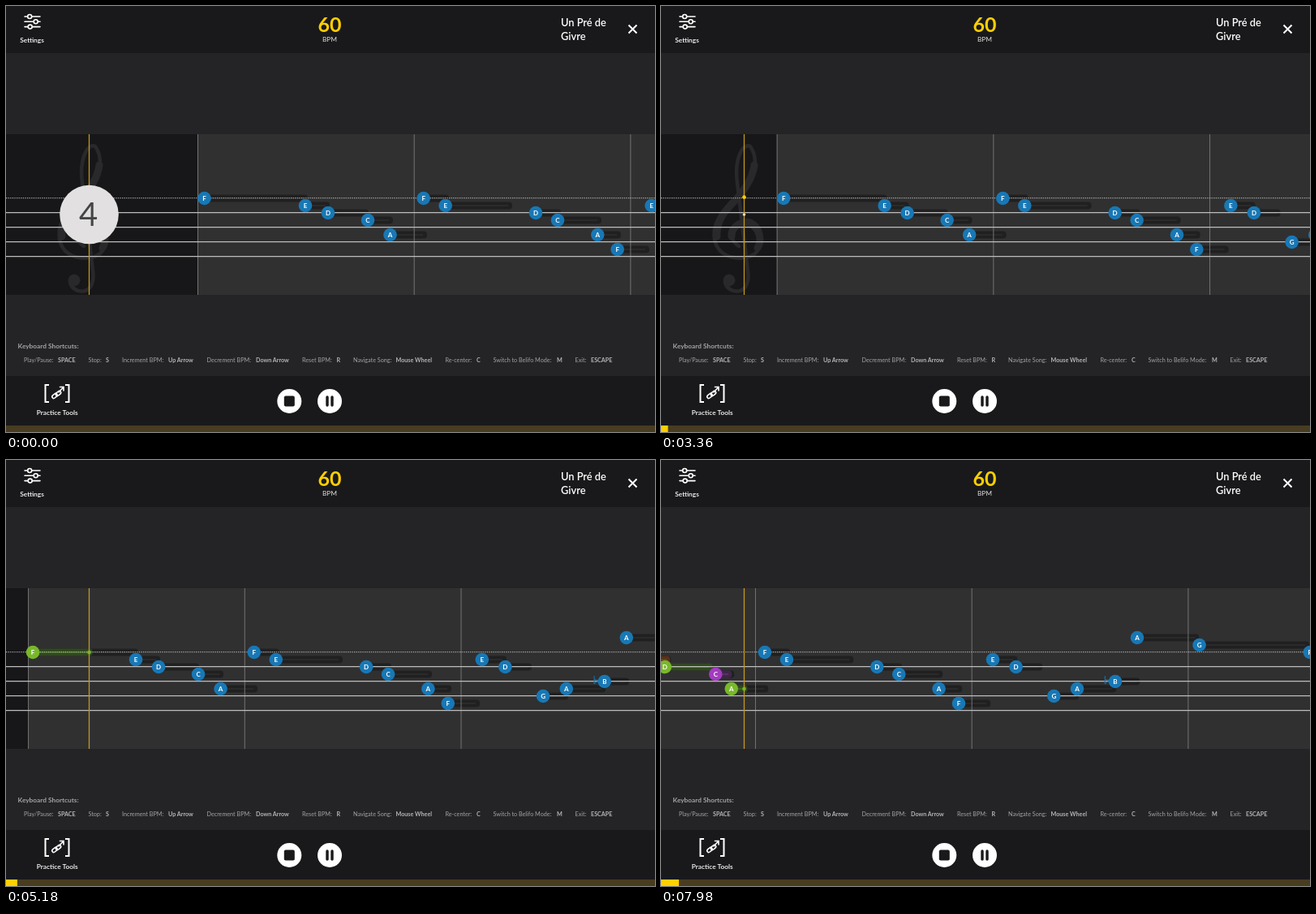
Animation, 800 px wide and 525 px high, one loop 8000 ms. Source, as an HTML page:

```html
<!DOCTYPE html>
<html lang="en">
<head>
<meta charset="utf-8">
<title>Practice player</title>
<style>
html, body { margin: 0; width: 100%; height: 100%; overflow: hidden; background: #242326; }
svg { display: block; width: 100vw; height: 100vh; font-family: Lato, "Open Sans", sans-serif; }
.mid { text-anchor: middle; }
.label { font-size: 8.4px; font-weight: 600; fill: #fff; }
.keys { font-size: 7.2px; fill: #a3a3a4; }
.keys .k { font-weight: 700; fill: #b4b4b5; }
.note text { font-size: 8px; font-weight: 700; fill: #fff; text-anchor: middle; }
.icon { fill: none; stroke: #fff; stroke-width: 1.6; stroke-linecap: round; }
</style>
</head>
<body>
<svg viewBox="0 0 800 525" preserveAspectRatio="none">
  <rect width="800" height="525" fill="#242326"/>
  <rect width="800" height="58" fill="#19191b"/>
  <rect y="456" width="800" height="61" fill="#19191b"/>

  <rect y="158" width="800" height="198" fill="#171719"/>
  <g fill="none" stroke="#29292b" stroke-linecap="round">
    <path stroke-width="4.5" d="M79 341C84 357 112 357 107 326L94 218C90 188 101 168 110 173C122 190 115 214 95 235C74 254 63 268 66 287C70 312 100 315 115 306C132 290 122 263 104 264C86 266 80 286 96 296"/>
    <path stroke-width="9" d="M115 196C113 212 104 226 91 240C78 253 68 265 69 284M119 298C126 288 120 268 104 267C93 268 86 276 87 284"/>
    <circle cx="84" cy="338" r="7" fill="#29292b"/>
  </g>
  <rect id="sheet" y="158" width="1600" height="198" fill="#303031"/>
  <g id="tails"></g>
  <g id="bars" stroke="#737374"></g>
  <path d="M0 236.7H800" stroke="#c4c4c4" stroke-dasharray="1.3 1.3"/>
  <path d="M0 254.6H800M0 272.6H800M0 290.6H800M0 308.6H800" stroke="#bdbdbd" stroke-width="1.3"/>
  <path d="M102.5 158V356" stroke="#c3981f" stroke-width="1.3"/>
  <g id="notes"></g>
  <circle id="rest" cx="102.5" cy="257" r="1.8" fill="#e6dcc0"/>
  <circle id="pitch" cx="102.5" r="2.3"/>
  <g id="count">
    <circle cx="102.5" cy="257" r="36.3" fill="#e2e0e0"/>
    <text id="digit" class="mid" x="101.5" y="270.5" font-size="40" fill="#454546"></text>
  </g>

  <g class="icon">
    <path d="M23 13H26.5M32 13H42M23 19.3H34M39.500 19.3H42M23 25.600H27M32.500 25.600H42"/>
    <circle cx="29.200" cy="13" r="2.5"/><circle cx="36.700" cy="19.300" r="2.500"/><circle cx="29.700" cy="25.600" r="2.500"/>
    <path stroke-width="2" stroke-linecap="butt" d="M767.500 23.500L777.500 33.500M777.500 23.500L767.500 33.500"/>
    <path stroke-width="2" stroke-linecap="butt" d="M53 467H48.500V488H53M73 467H77.500V488H73"/>
    <path d="M65 476L70.500 470M66.500 469.500H71V474"/>
    <rect x="-3.500" y="-2" width="7" height="4" rx="2" transform="translate(60 480.500) rotate(-40)"/>
    <rect x="-3.500" y="-2" width="7" height="4" rx="2" transform="translate(64.500 477.500) rotate(-40)"/>
  </g>
  <text class="label mid" x="32" y="44.500">Settings</text>
  <text class="label mid" x="63.200" y="503.500">Practice Tools</text>
  <text class="mid" x="399" y="32" font-size="25" font-weight="700" fill="#ffcf00">60</text>
  <text class="mid" x="399" y="44.300" font-size="8.400" fill="#dcdcdc">BPM</text>
  <g font-size="12.800" font-weight="600" fill="#fff">
    <text x="684" y="25">Un Pré de</text>
    <text x="684" y="41.500">Givre</text>
  </g>
  <text x="14.500" y="422" font-size="8.300" font-weight="700" fill="#a3a3a4">Keyboard Shortcuts:</text>
  <g id="keys" class="keys"></g>

  <circle cx="349.300" cy="487" r="15" fill="#fff"/>
  <rect x="342.800" y="480.500" width="13" height="13" rx="2" fill="#19191b"/>
  <circle cx="399" cy="487" r="15" fill="#fff"/>
  <path d="M396 482V492M402 482V492" stroke="#19191b" stroke-width="3.400" stroke-linecap="round"/>
  <rect y="517" width="800" height="8" fill="#483d20"/>
  <rect id="progress" y="517" height="8" fill="#ffcf00"/>
</svg>
<script>
const LOOP = 8000, STEP = 70, LINE = 102.5;
const SCROLL_AT = 1890, SPEED = 0.0635, THREE_AT = 840;
const BAR = 236, BAR_GAP = 266.7;
const BLUE = '#1878b5';
const HUES = {
  good: ['#78b82a', '#31491f', '#4c7a28'],
  early: ['#ff8410', '#573119', '#85481c'],
  late: ['#a43cc0', '#40264a', '#67357a']
};

// letter, x, y, tail end, then for played notes: timing shift, grade, played end
const SCORE = [
  ['F', 244.5, 237, 372, -2.5, 'good', 364],
  ['E', 369, 246, 399, -11, 'early', 398],
  ['D', 397, 255, 447, -5.5, 'good', 450],
  ['C', 446, 264, 477, 8, 'late', 474],
  ['A', 473.5, 282, 519, 0, 'good', 515],
  ['F', 514.7, 237, 546], ['E', 541.7, 246, 624],
  ['D', 653, 255, 684], ['C', 680, 264, 734],
  ['A', 729.3, 282, 758], ['F', 753.7, 300, 793],
  ['E', 795.7, 246, 826], ['D', 824.3, 255, 857],
  ['G', 871, 291, 902], ['A', 899.7, 282, 948],
  ['B', 946.7, 273, 977], ['A', 973.7, 219, 1050],
  ['G', 1050.3, 228, 1186], ['F', 1186.5, 237, 1240]
];

const KEYS = [
  [22, 'Play/Pause:', 64, 'SPACE'], [101.5, 'Stop:', 123, 'S'],
  [143, 'Increment BPM:', 200, 'Up Arrow'], [247.5, 'Decrement BPM:', 308, 'Down Arrow'],
  [365, 'Reset BPM:', 407.5, 'R'], [428, 'Navigate Song:', 480.5, 'Mouse Wheel'],
  [541.5, 'Re-center:', 580, 'C'], [600.5, 'Switch to Belifo Mode:', 679, 'M'],
  [701.5, 'Exit:', 721, 'ESCAPE']
];

const $ = id => document.getElementById(id);

function add(parent, tag, attrs, text) {
  const el = document.createElementNS('http://www.w3.org/2000/svg', tag);
  set(el, attrs);
  if (text) el.textContent = text;
  return parent.appendChild(el);
}

function set(el, attrs) {
  for (const key in attrs) el.setAttribute(key, attrs[key]);
}

function show(el, on) {
  el.setAttribute('visibility', on ? 'visible' : 'hidden');
}

function tail(x, y, end, fill, core) {
  const bar = add($('tails'), 'rect', { x, y: y - 4.5, width: end - x, height: 9, rx: 4, fill });
  const mid = add($('tails'), 'rect', { x, y: y - 0.6, width: Math.max(0, end - x - 5), height: 1.2, fill: core });
  return { bar, mid };
}

for (const [x, name, kx, key] of KEYS) {
  add($('keys'), 'text', { x, y: 438.7 }, name);
  add($('keys'), 'text', { x: kx, y: 438.7, class: 'k' }, key);
}

for (let i = 0; i < 5; i++) {
  const x = BAR + 0.5 + i * BAR_GAP;
  add($('bars'), 'path', { d: `M${x} 158V356` });
}

const notes = SCORE.map(([letter, x, y, end, shift, grade, stop]) => {
  tail(x, y, end, '#202021', '#303031');
  const g = add($('notes'), 'g', { class: 'note' });
  const dot = add(g, 'circle', { r: 8.3 });
  add(g, 'text', { y: 2.8 }, letter);
  const note = { x, y, g, dot, grade, stop, hit: grade ? x + shift : Infinity };
  if (grade) note.trail = tail(note.hit, y, stop, HUES[grade][1], HUES[grade][2]);
  return note;
});
add($('notes'), 'path', { d: 'M934 266V276L939 271.500L934 270.500', fill: 'none', stroke: BLUE });

function draw(t) {
  const off = Math.max(0, t - SCROLL_AT) * SPEED;
  const head = off + LINE;
  for (const id of ['tails', 'bars', 'notes']) set($(id), { transform: `translate(${-off} 0)` });
  set($('sheet'), { x: BAR - off });

  let current = null;
  for (const n of notes) {
    const played = head >= n.hit;
    if (played) current = n;
    set(n.g, { transform: `translate(${played ? n.hit : n.x} ${n.y})` });
    set(n.dot, { fill: played ? HUES[n.grade][0] : BLUE });
    if (!n.trail) continue;
    const len = Math.max(0, Math.min(n.stop, head + 4) - n.hit);
    show(n.trail.bar, played);
    show(n.trail.mid, played);
    set(n.trail.bar, { width: len });
    set(n.trail.mid, { width: Math.max(0, len - 4) });
  }

  const counting = t < SCROLL_AT;
  show($('count'), counting);
  $('digit').textContent = t < THREE_AT ? '4' : '3';
  show($('rest'), !counting && !current);
  show($('pitch'), !counting);
  const drift = 234 + 3 * Math.min(1, Math.max(0, (t - 2800) / 1050));
  set($('pitch'), {
    cy: current ? current.y : drift,
    fill: current ? HUES[current.grade][0] : '#ffcf00'
  });
  set($('progress'), { width: Math.max(0, t - 390) * 0.0029 });
}

const start = performance.now();
function tick() {
  const t = (performance.now() - start) % LOOP;
  draw(Math.floor(t / STEP) * STEP);
  requestAnimationFrame(tick);
}
tick();
</script>
</body>
</html>
```
